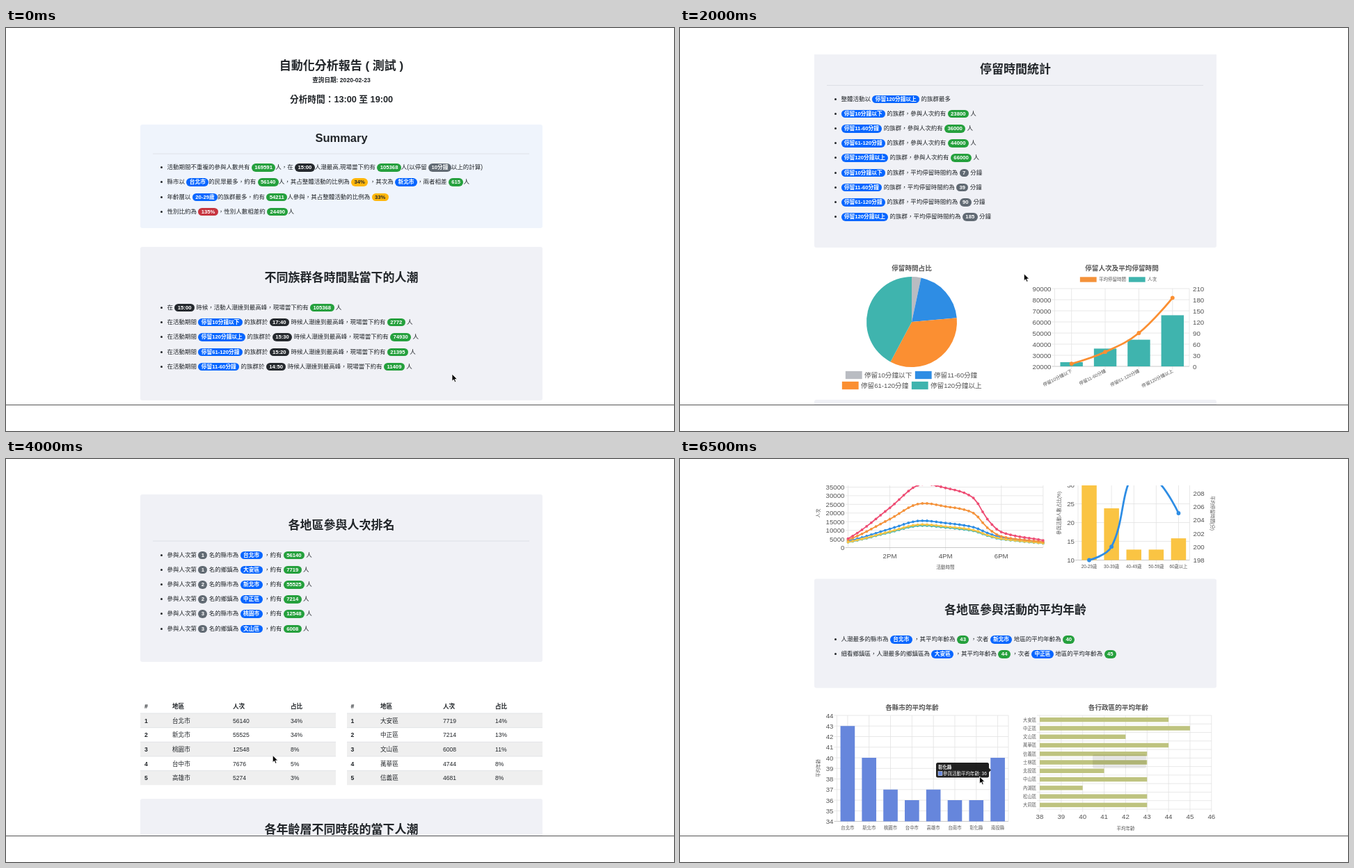
An HTML page that plays this animation: 960 by 580 pixels, repeating every 7000 ms.

```html
<!DOCTYPE html>
<html lang="zh-Hant">
<head>
<meta charset="utf-8">
<style>
html, body { margin: 0; width: 100%; height: 100%; overflow: hidden; background: #fff; }
body, svg { font-family: 'Liberation Sans', 'Noto Sans CJK TC', 'Noto Sans CJK', sans-serif; }
#view { position: absolute; left: 0; top: 38px; width: 960px; height: 505px; overflow: hidden; }
#page { position: absolute; left: 0; top: -38px; width: 960px; height: 3300px; }
svg { position: absolute; left: 0; top: 0; }
.row { position: absolute; left: 231.5px; font-size: 8.5px; font-weight: 500; line-height: 20px; white-space: pre; color: #212529; }
.row.dot::before { content: ''; position: absolute; left: -10px; top: 9px; width: 3px; height: 3px; border-radius: 50%; background: #212529; }
.row b { display: inline-block; font-size: 7.7px; line-height: 11.6px; padding: 0 4.4px; border-radius: 6px; color: #fff; }
.b { background: #0766ff; } .k { background: #25292e; } .g { background: #25a03d; }
.r { background: #c6343f; } .s { background: #616a73; }
.row .y { background: #ffb70c; color: #212529; }
</style>
</head>
<body>
<div id="view"><div id="page"></div></div>
<svg id="over" width="960" height="580">
  <path d="M0 542.5H960" stroke="#555"/>
  <rect id="thumb" x="957" width="4" height="80" rx="1.5" fill="#6b6b6b"/>
  <path id="cursor" d="M0 0V10.2L2.4 8.1L4 11.7L5.7 11L4.2 7.4H7.4Z" fill="#000" stroke="#fff" stroke-width=".8"/>
</svg>
<script>
const PINK = '#ee4d74', ORANGE = '#f4923a', YELLOW = '#fac443', TEAL = '#3fb4ae', BLUE = '#2e8de4', GREY = '#b9bcc2';
const PALETTE = [PINK, ORANGE, YELLOW, TEAL, BLUE];
const page = document.getElementById('page');
let art = '', rows = '';

const range = (a, b, step) => Array.from({ length: Math.round((b - a) / step) + 1 }, (_, i) => a + i * step);

function text(s, x, y, size, { anchor = 'middle', bold, color = '#555', turn, strike } = {}) {
  const rot = turn ? ` transform="rotate(${turn} ${x} ${y})"` : '';
  return `<text x="${x}" y="${y + size * 0.37}" font-size="${size}" text-anchor="${anchor}" fill="${color}"` +
    `${bold ? ' font-weight="bold"' : ''}${strike ? ' text-decoration="line-through"' : ''}${rot}>${s}</text>`;
}
const rect = (x, y, w, h, fill, more = '') => `<rect x="${x}" y="${y}" width="${w}" height="${h}" fill="${fill}" ${more}/>`;
const line = (x1, y1, x2, y2, color = '#e3e3e3') => `<path d="M${x1} ${y1}L${x2} ${y2}" stroke="${color}" stroke-width=".8"/>`;
const dot = (x, y, r, color) => `<circle cx="${x}" cy="${y}" r="${r}" fill="${color}"/>`;
const heading = (s, y, size = 17) => text(s, 482, y, size, { bold: true, color: '#212529' });
const caption = (s, x, y, size = 9.6) => text(s, x, y, size, { bold: true });
const label = (s, x, y, turn) => text(s, x, y, 6.5, { turn });
const layer = (id, s) => `<g class="layer" id="${id}">${s}</g>`;
const section = (dy, ...parts) => { art += `<g transform="translate(0 ${dy})">${parts.join('')}</g>`; };
const rule = y => line(211, y, 752, y, '#d9dbe1');
const panel = (y, h, title, fill = '#f0f1f6') => rect(193, y, 578, h, fill, 'rx="3"') + heading(title, y + 44);

// {c...} in a row becomes a badge of class c
function list(y, items, gap = 21.2) {
  items.forEach((s, i) => {
    const html = s.replace(/\{(\w)([^}]*)\}/g, '<b class="$1">$2</b>');
    rows += `<div class="row ${s[0] === '，' ? '' : 'dot'}" style="top:${y + i * gap - 10.4}px">${html}</div>`;
  });
}

function axes({ x, y, w, h }, { left, right = [], cols = [], size = 9.7, colSize = size, colY = 11.5 }) {
  let s = '';
  cols.forEach(([cx, name]) => { s += line(cx, y, cx, y + h + 4) + text(name, cx, y + h + colY, colSize); });
  left.forEach((v, i) => {
    const ly = y + h - h * i / (left.length - 1);
    s += line(x - 4, ly, x + w, ly, i ? undefined : '#bbb') + text(v, x - 5, ly, size, { anchor: 'end' });
  });
  right.forEach((v, i) => { s += text(v, x + w + 5, y + h - h * i / (right.length - 1), size, { anchor: 'start' }); });
  return s + line(x, y, x, y + h) + line(x + w, y, x + w, y + h);
}
// The time axis runs from 12:30 to 19:30
const hours = ({ x, w }, every = 1) => range(every, 7, every).filter(n => n < 8).map(n => [x + (n - .5) * w / 7, n + 'PM']);
const centers = ({ x, w }, names) => names.map((n, i) => [x + w * (i + .5) / names.length, n]);
const yOf = ({ y, h }, lo, hi, v) => y + h - h * (v - lo) / (hi - lo);

// Crowd over time: a cubic through a few key hours
const KEYS = [0, 1.5, 2.5, 3.5, 4.5, 5, 5.5, 7];
function crowdAt(v, t) {
  const last = KEYS.length - 1;
  const i = Math.min(KEYS.findLastIndex(k => k <= t), last - 1), d = KEYS[i + 1] - KEYS[i], f = (t - KEYS[i]) / d;
  const slope = k => {
    const a = Math.max(k - 1, 0), b = Math.min(k + 1, last);
    return (v[b] - v[a]) / (KEYS[b] - KEYS[a]) * (k ? 1 : .7) * d;
  };
  const rise = v[i + 1] - v[i], m = slope(i), n = slope(i + 1);
  return v[i] + f * (m + f * (3 * rise - 2 * m - n + f * (m + n - 2 * rise)));
}
function series(box, lo, hi, color, v, scale = 1) {
  const pts = range(0, 42, 1).map(i =>
    [box.x + box.w * i / 42, yOf(box, lo, hi, scale * crowdAt(v, i / 6))].map(n => n.toFixed(1)));
  return `<path d="M${pts.join('L')}" fill="none" stroke="${color}" stroke-width="1.8" stroke-linejoin="round"/>` +
    pts.map(p => dot(p[0], p[1], 1.9, color)).join('');
}
// Bezier line whose handles follow the lengths of the neighbouring spans
function curve(box, lo, hi, color, v) {
  const p = centers(box, v).map(([x, n]) => [x, yOf(box, lo, hi, n)]);
  const gap = (a, b) => Math.hypot(a[0] - b[0], a[1] - b[1]);
  const handle = (i, side) => {
    const a = p[i - 1], b = p[i], c = p[i + 1];
    if (!a || !c) return b;
    const k = side * .4 * gap(b, side < 0 ? a : c) / (gap(a, b) + gap(b, c));
    return [b[0] + k * (c[0] - a[0]), b[1] + k * (c[1] - a[1])];
  };
  const d = p.slice(1).map((q, i) => `C${handle(i, 1)} ${handle(i + 1, -1)} ${q}`).join('');
  return `<path d="M${p[0]}${d}" fill="none" stroke="${color}" stroke-width="2.8"/>` + p.map(q => dot(q[0], q[1], 2.9, color)).join('');
}
function bars(box, lo, hi, color, v) {
  const bw = box.w / v.length * .67;
  return centers(box, v).map(([x, n]) => {
    const y = yOf(box, lo, hi, n);
    return rect(x - bw / 2, y, bw, box.y + box.h - y, color);
  }).join('');
}
function legend(y, items, { h = 11, size = 9.6, soft = 1 } = {}) {
  return items.map(([x, name, color, strike]) =>
    rect(x + .5, y - h / 2 + .5, 22.5, h - 1, color, `fill-opacity="${soft}" stroke="${color}" stroke-width="1.3"`) +
    text(name, x + 27, y, size, { anchor: 'start', strike })).join('');
}
const evenLegend = (x, y, gap, names, struck = []) =>
  legend(y, names.map((n, i) => [x + gap * i, n, PALETTE[i], struck.includes(n)]));

function tip(x, y, w, head, items, side) {
  const h = 14 + 7.5 * items.length, m = y + h / 2, e = side < 0 ? x : x + w;
  return `<g opacity=".87">${rect(x, y, w, h, '#000', 'rx="2.5"')}<path d="M${e} ${m - 3}L${e + 3 * side} ${m}L${e} ${m + 3}"/></g>` +
    text(head, x + 3, y + 6.5, 6.5, { anchor: 'start', bold: true, color: '#fff' }) +
    items.map(([name, color], i) => rect(x + 3, y + 12.7 + 7.5 * i, 6, 6, color, 'stroke="#fff" stroke-width=".5"') +
      text(name, x + 10, y + 15.7 + 7.5 * i, 6.5, { anchor: 'start', color: '#fff' })).join('');
}

// Overview
section(0,
  heading('自動化分析報告 ( 測試 )', 54), heading('查詢日期: 2020-02-23', 75, 8.6), heading('分析時間：13:00 至 19:00', 102, 12.7),
  rect(193, 139, 578, 149, '#eff4fc', 'rx="3"'), heading('Summary', 158, 16.5), rule(181),
  panel(315, 221, '不同族群各時間點當下的人潮'));
list(200.5, [
  '活動期間不重複的參與人數共有 {g169591}人，在 {k15:00}人潮最高,現場當下約有 {g105368}人(以停留 {s10分鐘}以上的計算)',
  '縣市以 {b台北市}的民眾最多，約有 {g56140}人，其占整體活動的比例為 {y34%} ，其次為 {b新北市}，兩者相差 {g615}人',
  '年齡層以 {b20-29歲}的族群最多，約有 {g54211}人參與，其占整體活動的比例為 {y33%}',
  '性別比約為 {r135%}，性別人數相差約 {g24490}人']);
const peaks = [['10分鐘以下', '17:40', 2772], ['120分鐘以上', '15:30', 74930], ['61-120分鐘', '15:20', 21395], ['11-60分鐘', '14:50', 11409]];
list(402, ['在 {k15:00} 時候，活動人潮達到最高峰，現場當下約有 {g105368} 人',
  ...peaks.map(([a, b, c]) => `在活動期間 {b停留${a}} 的族群於 {k${b}} 時候人潮達到最高峰，現場當下約有 {g${c}} 人`)], 21.3);

// Crowd by length of stay
const stays = ['停留10分鐘以下', '停留11-60分鐘', '停留61-120分鐘', '停留120分鐘以上'];
const stayBox = { x: 245.5, y: 313.5, w: 523.8, h: 109.5 };
section(283,
  caption(`不同族群各時間點當下的人潮`, 482, 282, 10.7),
  legend(303.5, [[283, stays[0], PINK], [383, stays[1], BLUE], [478, stays[2], TEAL], [579, stays[3], ORANGE]], { soft: .55 }),
  axes(stayBox, { left: range(0, 80000, 10000), cols: hours(stayBox) }),
  text('不重複人次', 200.5, 368, 9.4, { turn: -90 }), label('活動時間', 507, 451),
  series(stayBox, 0, 80, ORANGE, [16, 53, 73, 73, 63, 44, 26, 12]),
  series(stayBox, 0, 80, TEAL, [2.5, 12.5, 20.5, 20, 12.5, 8, 6, 4]),
  series(stayBox, 0, 80, BLUE, [3, 5.5, 11, 6.5, 8, 5, 4, 3.7]),
  series(stayBox, 0, 80, PINK, KEYS.map(k => 1.9 + .3 * Math.cos(k))),
  layer('stayTip', tip(474, 365, 84, '15:30', [[stays[0] + ': 2307', PINK], [stays[1] + ': 8169', BLUE], [stays[2] + ': 21292', TEAL], [stays[3] + ': 74930', ORANGE]], -1)),
  panel(468, 301, '停留時間統計'), rule(535.5));
const stayN = [23.8, 36, 44, 66], stayMean = [7, 39, 90, 185];
list(838, ['整體活動以 {b停留120分鐘以上} 的族群最多',
  ...stays.map((s, i) => `{b${s}} 的族群，參與人次約有 {g${stayN[i] * 1000}} 人`),
  ...stays.map((s, i) => `{b${s}} 的族群，平均停留時間約為 {s${stayMean[i]}} 分鐘`)]);

// Shares of stay, crowd by county
const pie = { x: 333, y: -9, r: 65 };
function slice(a, b, color) {
  const at = d => [pie.x + pie.r * Math.sin(d * Math.PI / 180), pie.y - pie.r * Math.cos(d * Math.PI / 180)];
  return `<path d="M${pie.x} ${pie.y}L${at(a)}A${pie.r} ${pie.r} 0 0 1 ${at(b)}Z" fill="${color}"/>`;
}
const shareBox = { x: 538.5, y: -57, w: 193.5, h: 112 };
const cityBox = { x: 231.3, y: 311, w: 501, h: 117 };
const cities = ['台北市', '新北市', '桃園市', '台中市', '高雄市'], byCrowd = ['新北市', '台北市', '桃園市', '台中市', '高雄市'];
const others = [1.5, 5.6, 8.6, 7.9, 5.7, 3.2, 1.8, .9];
section(1168,
  caption('停留時間占比', 333, -87), caption('停留人次及平均停留時間', 635, -87),
  slice(0, 12, GREY), slice(12, 85, BLUE), slice(85, 208, '#fb8f32'), slice(208, 360, TEAL),
  legend(67.5, [[238, stays[0], GREY], [338, stays[1], BLUE]]),
  legend(82.5, [[233, stays[2], '#fb8f32'], [333, stays[3], TEAL]]),
  legend(-70, [[575, '平均停留時間', ORANGE], [645, '人次', TEAL]], { h: 7, size: 6.5 }),
  axes(shareBox, { left: range(20000, 90000, 10000), right: range(0, 210, 30), cols: centers(shareBox, ['', '', '', '']) }),
  bars(shareBox, 20, 90, TEAL, stayN), curve(shareBox, 0, 210, '#fb8f32', stayMean),
  stays.map((s, i) => text(s, 563 + 48.4 * i, 61, 6.5, { anchor: 'end', turn: -27 })).join(''),
  panel(103, 148, '各縣市不同時段的當下人潮'), rule(170.5),
  caption('各縣市不同時段的當下人潮', 482, 279.5), evenLegend(332, 301, 60.5, byCrowd),
  axes(cityBox, { left: range(5000, 35000, 5000), right: range(0, 35000, 5000), cols: hours(cityBox), size: 6.5, colY: 9 }),
  label('新北市當地民眾人次', 198.5, 369, -90), label('其他縣市人次', 765, 369, 90), label('活動時間', 482, 449.5),
  series(cityBox, 0, 35, BLUE, others, .47), series(cityBox, 0, 35, TEAL, others, .68), series(cityBox, 0, 35, YELLOW, others),
  series(cityBox, 0, 35, ORANGE, [7.2, 22.1, 32.3, 31.4, 27.1, 18.5, 14.2, 7]),
  series(cityBox, 5, 35, PINK, [6.7, 23.7, 34.9, 32.2, 26.8, 18, 10.9, 5.7]),
  layer('cityTip', tip(449, 352, 54, '16:20', [30376, 29587, 7147, 4800, 3267].map((n, i) => [`${byCrowd[i]}: ${n}`, PALETTE[i]]), 1)));
list(1168 + 190, ['以當地 {b新北市} 的人次為多，且當 {k15:00} 時現場人數達到最高約有 {g34906} 的人，相較於活動最低點 {k19:30} 的時後現場人數有 {g5575}',
  '，約有 {y6.2} 倍'], 12.7);

// Districts
const areaBox = { x: 236.5, y: 366.5, w: 532.3, h: 111 };
function districts(lo, all) {
  const plot = (color, v, scale) => series(areaBox, lo, 5, color, v, scale);
  const daan = [1.05, 3.1, 4.62, 4.66, 4.1, 2.86, 2.14, 1.13], wanhua = [.74, 2.06, 2.52, 2.46, 2.3, 1.71, 1.19, .7];
  return evenLegend(332, 356.5, 60.5, ['中正區', '大安區', '文山區', '萬華區', '北投區'], all ? [] : ['中正區', '北投區']) +
    axes(areaBox, { left: range(lo * 1000, 5000, 500), cols: hours(areaBox) }) +
    (all ? plot(BLUE, wanhua, .8) : '') + plot(TEAL, wanhua) +
    plot(YELLOW, [.76, 2.46, 3.6, 3.47, 2.94, 1.97, 1.37, .72]) + plot(ORANGE, daan) +
    (all ? plot(PINK, daan, .89) : '');
}
section(1485,
  panel(150, 157, '各鄉鎮不同時段的當下人潮'), rule(217),
  caption('各鄉鎮不同時段的當下人潮', 482, 335),
  layer('allAreas', districts(0, true)), layer('someAreas', districts(.5, false)),
  label('人次', 198.5, 422, -90), label('活動時間', 503, 505),
  layer('areaTip', tip(404, 387.5, 50, '14:40', [['大安區: 4322', ORANGE], ['文山區: 3383', YELLOW], ['萬華區: 2540', TEAL]], -1)));
list(1485 + 237, [['中正區', 4166, 1419, 2747], ['大安區', 4716, 1067, 3649]].map(([a, b, c, d]) =>
  `{b${a}} 的居民以 {k15:20} 時當下現場人數達到最高約有 {g${b}} 的人，相較於活動最低點 {k12:30} 時的人數 {g${c}} ，差異約有 {y${d}} 人`));

// Ranking
const areas = ['大安區', '中正區', '文山區', '萬華區', '信義區'];
const cityN = [56140, 55525, 12548, 7676, 5274], areaN = [7719, 7214, 6008, 4744, 4681];
section(1956, panel(51, 241, '各地區參與人次排名'), rule(118));
list(1956 + 138, cities.slice(0, 3).flatMap((c, i) => [
  `參與人次第 {s${i + 1}} 名的縣市為 {b${c}} ，約有 {g${cityN[i]}} 人`,
  `參與人次第 {s${i + 1}} 名的鄉鎮為 {b${areas[i]}} ，約有 {g${areaN[i]}} 人`]));

function table(x, cols, names, counts, shares) {
  const cell = (s, i, y, bold) => text(s, x + cols[i], y, 8.6, { anchor: 'start', bold, color: '#212529' });
  return ['#', '地區', '人次', '占比'].map((n, i) => cell(n, i, 13.5, true)).join('') + names.map((n, i) => {
    const y = 24 + 20.65 * i;
    return rect(x, y, 281, 20.65, i % 2 ? '#fff' : '#efefef') + line(x, y, x + 281, y, '#dcdfe3') +
      [i + 1, n, counts[i], shares[i] + '%'].map((v, c) => cell(v, c, y + 10.4, !c)).join('');
  }).join('');
}

// Age groups
const ageBox = { x: 241.5, y: 420, w: 280.3, h: 99.5 }, meanBox = { x: 572, y: 402.5, w: 160.5, h: 135 };
const ages = ['20-29歲', '30-39歲', '40-49歲', '50-59歲', '60歲以上'];
const older = [3.8, 10.8, 15.4, 14.2, 11.8, 8.5, 6, 3];
section(2298,
  table(193, [6, 46, 133, 216], cities, cityN, [34, 34, 8, 5, 3]),
  table(490, [5.5, 48, 138, 213], areas, areaN, [14, 13, 11, 8, 8]),
  panel(147, 199.5, '各年齡層不同時段的當下人潮'),
  caption('各年齡層不同時段的當下人潮', 358, 374), caption('族群人次及平均停留時間', 655, 374),
  evenLegend(227, 395.5, 66.5, ages.slice(0, 4)), legend(410.5, [[324, ages[4], BLUE]]),
  axes(ageBox, { left: range(0, 40000, 5000), cols: hours(ageBox, 2) }),
  label('人次', 199, 470, -90), label('活動時間', 381.5, 547.5),
  series(ageBox, 0, 40, BLUE, older), series(ageBox, 0, 40, TEAL, older, .82), series(ageBox, 0, 40, YELLOW, older, .86),
  series(ageBox, 0, 40, ORANGE, [4.5, 16.5, 25.2, 23.8, 20, 11.5, 6.5, 3.3]),
  series(ageBox, 0, 40, PINK, [5.2, 23, 36, 34.5, 28.7, 16.5, 9, 4.2]),
  legend(394, [[594, '平均停留時間', BLUE]], { h: 8, size: 6.5, soft: .4 }), legend(394, [[662, '人數占比', YELLOW]], { h: 8, size: 6.5 }),
  axes(meanBox, { left: range(10, 35, 5), right: range(198, 212, 2), cols: centers(meanBox, ages), colSize: 6.3, colY: 9.5 }),
  label('參與活動人數占比(%)', 545, 470, -90), label('平均停留時間(分)', 765, 470, 90),
  bars(meanBox, 10, 35, YELLOW, [32.8, 23.8, 12.8, 12.8, 15.8]), curve(meanBox, 198, 212, BLUE, [198, 200, 211, 210, 205]),
  layer('meanTip', tip(614, 457, 66, '50-59歲', [['平均停留時間: 210', '#8cc4f3'], ['人數占比: 13', YELLOW]], 1)));
list(2298 + 234, [
  ...[['20-29歲', '15:30'], ['50-59歲', '15:00']].map(([a, b]) =>
    `活動期間增減差異最多的群族為 {b${a}} ，現場人數最多的時間點在 {k${b}} ，而最少的時間點在 {k19:30}`),
  '占比最高的年齡族群為 {b20-29歲} ，最低的年齡族群為 {b50-59歲} 兩者占比相差 {y20%}',
  '平均停留時間最久的年齡族群為 {b40-49歲} ，最短的年齡族群為 {b20-29歲} ，相差 {s13} 分鐘']);

// Mean age by place
const countyBox = { x: 225.5, y: 369, w: 246.5, h: 152.5 };
const towns = ['大安區', '中正區', '文山區', '萬華區', '信義區', '士林區', '北投區', '中山區', '內湖區', '松山區', '大同區'];
const townAge = [44, 45, 42, 44, 43, 43, 41, 43, 40, 43, 43], OLIVE = '#bec37f', INDIGO = '#6686dc';
const townX = v => 517 + 30.85 * (v - 38);
section(2690,
  panel(172.5, 157, '各地區參與活動的平均年齡'),
  caption('各縣市的平均年齡', 333.5, 357.5), caption('各行政區的平均年齡', 630, 357.5),
  axes(countyBox, { left: range(34, 44, 1), cols: centers(countyBox, [...cities, '台南市', '彰化縣', '南投縣']), colSize: 6.4, colY: 9.5 }),
  label('平均年齡', 198.5, 445, -90), bars(countyBox, 34, 44, INDIGO, [43, 40, 37, 36, 37, 36, 36, 40]),
  range(38, 46, 1).map(v => line(townX(v), 369, townX(v), 508) + text(v, townX(v), 514.5, 9.7)).join(''),
  towns.map((n, i) => {
    const y = 369 + 12.27 * i;
    return line(513, y, 764, y) + rect(517, y + 3, townX(townAge[i]) - 517, 6.4, OLIVE) + text(n, 512, y + 6.2, 6.3, { anchor: 'end' });
  }).join(''),
  line(513, 504, 764, 504), label('平均年齡', 640.5, 532),
  layer('townTip', tip(593, 425.5, 74, '士林區', [['參與活動平均年齡: 43', OLIVE]], 1)),
  layer('townFade', rect(593, 425.5, 77, 19.5, '#000', 'rx="2" opacity=".08"')),
  layer('countyTip', tip(368, 437, 76, '彰化縣', [['參與活動平均年齡: 36', INDIGO]], 1)));
list(2690 + 259.5, [
  '人潮最多的縣市為 {b台北市} ，其平均年齡為 {g43} ，次者 {b新北市} 地區的平均年齡為 {g40}',
  '細看鄉鎮區，人潮最多的鄉鎮區為 {b大安區} ，其平均年齡為 {g44} ，次者 {b中正區} 地區的平均年齡為 {g45}']);

page.innerHTML = `<svg width="960" height="3300">${art}</svg>${rows}`;

const BEAT = 500, BEATS = 14;
const stops = [[0, 0], [1, 283], [3, 736], [5, 1168], [6, 1485], [8, 1956], [9, 2298], [11, 2339], [12, 2690]];
const pointer = [[0, 641, 498], [2, 466, 393], [5, 508.5, 334], [7, 405.5, 438], [9, 361, 415], [11, 695.5, 460.5], [12, 640, 438], [13, 430.5, 457]];
const barBeats = [2, 3, 6, 9, 11, 12];
const layerBeat = { stayTip: 2, cityTip: 5, allAreas: 6, someAreas: 7, areaTip: 7, meanTip: 11, townTip: 12, townFade: 13, countyTip: 13 };
const layers = [...document.querySelectorAll('.layer')];
const thumb = document.getElementById('thumb'), cursor = document.getElementById('cursor');

function pointerAt(beat) {
  const i = pointer.findLastIndex(p => p[0] <= beat), a = pointer[i], b = pointer[i + 1] || a;
  const f = (beat - a[0]) / (b[0] - a[0] || 1);
  return [1, 2].map(k => a[k] + f * (b[k] - a[k]));
}
let shown = -1;
function draw(t) {
  const beat = Math.floor(t / BEAT) % BEATS;
  if (beat === shown) return;
  shown = beat;
  const scroll = stops.findLast(s => s[0] <= beat)[1];
  page.style.transform = `translateY(${-scroll}px)`;
  thumb.style.display = barBeats.includes(beat) ? '' : 'none';
  thumb.setAttribute('y', 41.5 + scroll * .1573);
  cursor.setAttribute('transform', `translate(${pointerAt(beat)})`);
  layers.forEach(l => { l.style.display = layerBeat[l.id] === beat ? '' : 'none'; });
}
const start = performance.now();
function tick() {
  draw(performance.now() - start);
  requestAnimationFrame(tick);
}
tick();
</script>
</body>
</html>
```
